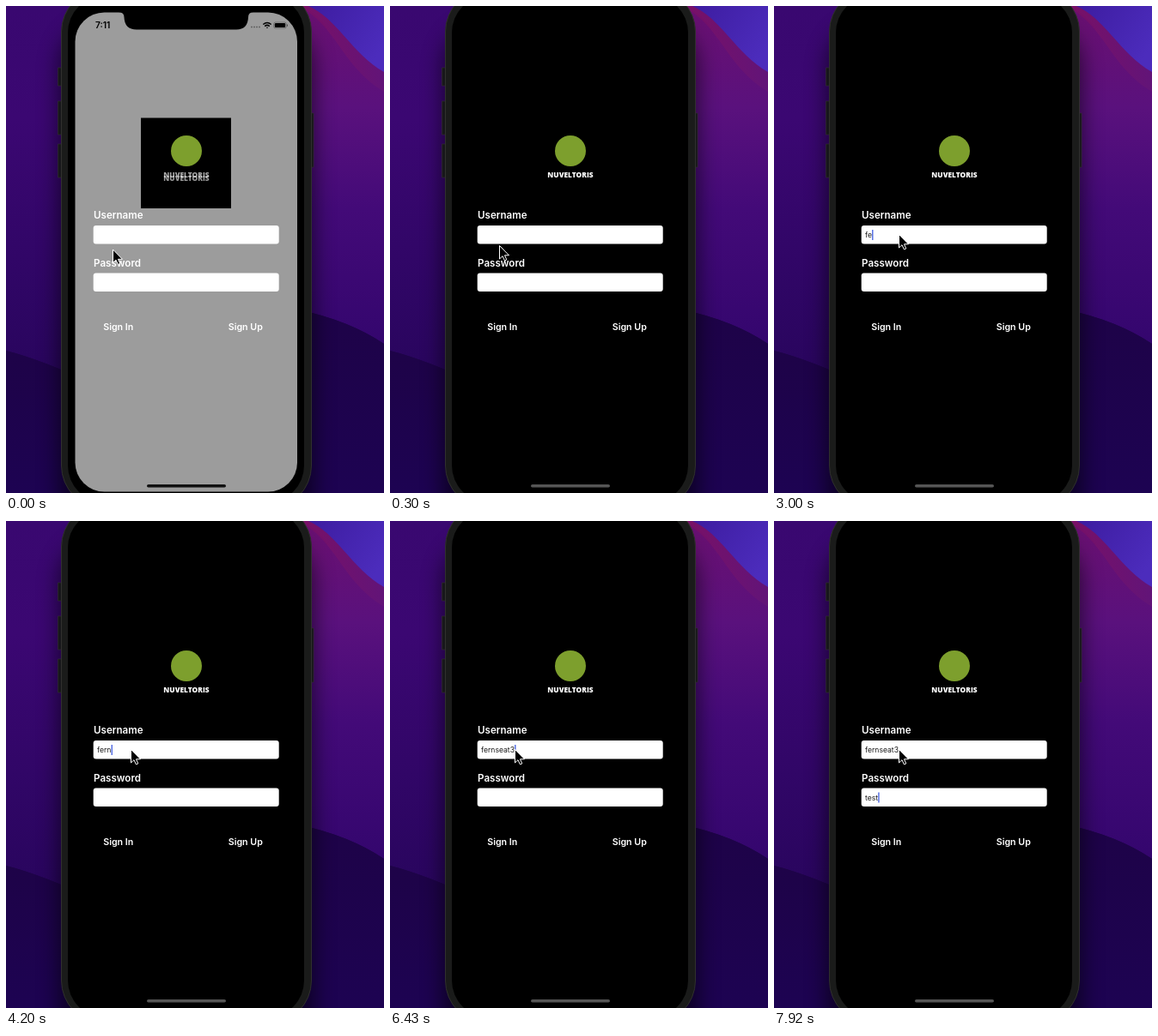
Recreate the animation shown at these times as an HTML page. Size 440 by 568 pixels, loop 8 s.

```html
<!DOCTYPE html>
<html lang="en">
<head>
<meta charset="utf-8">
<title>Sign-in screen</title>
<style>
  html, body { margin: 0; width: 100%; height: 100%; overflow: hidden; background: #1c0347; }
  svg { display: block; width: 440px; height: 568px; font-family: Inter, Roboto, sans-serif; }
  .label { font-size: 11.6px; font-weight: 600; fill: #fff; }
  .button { font-size: 10.7px; font-weight: 600; fill: #fff; }
  .entry { font-size: 8.6px; fill: #1a1a1a; }
  .brand { font: 800 8.4px "Open Sans", "Noto Sans", sans-serif; fill: #fff; text-anchor: middle; }
</style>
</head>
<body>
<svg viewBox="0 0 440 568">
  <defs>
    <linearGradient id="left" x2="0" y2="1">
      <stop offset="0" stop-color="#390870"/>
      <stop offset=".3" stop-color="#3b0772"/>
      <stop offset="1" stop-color="#28055d"/>
    </linearGradient>
    <linearGradient id="right" x2="0" y2="1">
      <stop offset="0" stop-color="#6a1070"/>
      <stop offset=".3" stop-color="#5a117d"/>
      <stop offset=".6" stop-color="#430a78"/>
      <stop offset="1" stop-color="#34066e"/>
    </linearGradient>
    <linearGradient id="low" x2="0" y2="1">
      <stop offset="0" stop-color="#1e0348"/>
      <stop offset="1" stop-color="#1d0352"/>
    </linearGradient>
    <linearGradient id="sky" x2="1" y2=".6">
      <stop offset="0" stop-color="#3d1ca0"/>
      <stop offset="1" stop-color="#4c2cbc"/>
    </linearGradient>
    <linearGradient id="band">
      <stop offset="0" stop-color="#7a1066"/>
      <stop offset="1" stop-color="#621478"/>
    </linearGradient>
    <filter id="blur" x="-30%" y="-30%" width="160%" height="160%">
      <feGaussianBlur stdDeviation="13"/>
    </filter>
  </defs>

  <!-- wallpaper -->
  <path d="M0 0H100V440Q40 412 0 402Z" fill="url(#left)"/>
  <path d="M0 402Q40 412 100 440V568H0Z" fill="url(#low)"/>
  <path d="M340 0H440V394Q400 367 340 354Z" fill="url(#right)"/>
  <path d="M340 0C385 22 390 70 440 100V77C402 55 385 14 352 0Z" fill="url(#band)"/>
  <path d="M352 0C385 14 402 55 440 77V0Z" fill="url(#sky)"/>
  <path d="M340 354Q400 367 440 394V568H340Z" fill="url(#low)"/>

  <!-- phone -->
  <rect x="62" y="20" width="296" height="600" rx="50" opacity=".6" filter="url(#blur)"/>
  <path d="M60.500 72h5v21h-5zM60.500 111h5v39h-5zM60.500 161h5v39h-5zM354 125h4v63h-4z" fill="#17171a" stroke="#33322f" stroke-width=".6"/>
  <rect x="64.500" y="-20" width="291" height="606" rx="50" fill="#1a1b1a" stroke="#30302e"/>
  <rect x="72" y="-12" width="275" height="591" rx="43"/>
  <rect id="screen" x="80.500" y="7.500" width="258.500" height="559" rx="34"/>
  <path d="M131 7Q137.500 7.500 137.500 13Q138 27.500 152 27.500H268Q281.500 27.500 282 13Q282 7.500 288 7Z"/>

  <!-- status bar -->
  <text x="104" y="26" font-size="10.2" font-weight="600">7:11</text>
  <path d="M285 24.500h11" stroke="#000" stroke-opacity=".35" stroke-width="1.600" stroke-dasharray="2 1"/>
  <g fill="none" stroke="#000" stroke-width="1.500">
    <path d="M299.300 21.500q4.700 -4 9.400 0M301.200 23.600q2.800 -2.400 5.600 0"/>
    <path d="M304 26.300l-1.200 -1.500h2.400z" stroke="none" fill="#000"/>
    <rect x="311.700" y="19" width="14.600" height="7" rx="2" stroke-opacity=".4" stroke-width=".7"/>
  </g>
  <rect x="312.800" y="20" width="12.400" height="5" rx="1.200"/>
  <rect x="327" y="21.500" width="1" height="2.200" opacity=".5"/>

  <!-- logo -->
  <rect x="157" y="130.500" width="105" height="105.500"/>
  <circle cx="210" cy="169" r="18" fill="#7d9f2d"/>
  <text class="brand" id="ghost" x="210" y="203.500">NUVELTORIS</text>
  <text class="brand" id="brand" x="210" y="199.800">NUVELTORIS</text>

  <!-- form -->
  <text class="label" x="102" y="248">Username</text>
  <text class="label" x="102" y="303.500">Password</text>
  <rect x="101.700" y="256" width="216" height="21.400" rx="3" fill="#fff"/>
  <rect x="101.700" y="311.500" width="216" height="21.400" rx="3" fill="#fff"/>
  <text class="button" x="113.200" y="378">Sign In</text>
  <text class="button" x="258.700" y="378">Sign Up</text>
  <rect id="mark" x="104" y="261" height="12" fill="#c8d5ec"/>
  <text class="entry" id="user" x="106" y="270"></text>
  <text class="entry" id="pass" x="106" y="325.500"></text>
  <rect id="caret" width="1.300" height="12" fill="#3f5ce0"/>

  <rect id="home" x="164" y="558" width="92" height="3.500" rx="1.750"/>
  <path id="pointer" d="M0 0V15.500L3.500 12.200L5.900 17.400L8.300 16.400L6 11.300H11Z" stroke="#fff"/>
</svg>
<script>
const LOOP = 8000, USER = "fernseat3", PASS = "test";
const userKeys = [2850, 3000, 3150, 3300, 4800, 4950, 5690, 5830, 6430];
const passKeys = [7480, 7630, 7780, 7920];
const blinks = [[0, 0], [1950, 1], [2550, 0], [2850, 1], [3750, .5], [3900, 0], [4200, 1],
  [5390, .5], [5540, 0], [5690, 1], [6280, .5], [6430, 1], [7330, .5], [7480, 1]];
const moves = [[0, "124.500 284"], [300, "127.500 279.500"], [1200, "140 271"], [1350, "145.500 266.500"]];
// time, screen, home bar, wordmark opacity, ghost opacity
const fades = [[0, "#9c9c9c", "#111", .65, .6], [150, "#434343", "#363636", .95, .4], [300, "#000", "#555", 1, 0]];

const $ = id => document.getElementById(id);
const set = (id, attrs) => {
  for (const name in attrs) $(id).setAttribute(name, attrs[name]);
};
const at = (steps, t) => steps.filter(step => step[0] <= t).pop();
const type = (id, text, keys, t) => {
  $(id).textContent = text.slice(0, keys.filter(k => k <= t).length);
  return $(id).textContent ? $(id).getComputedTextLength() : 0;
};

function draw(t) {
  const [, screen, home, brand, ghost] = at(fades, t);
  set("screen", { fill: screen });
  set("home", { fill: home });
  set("brand", { opacity: brand });
  set("ghost", { opacity: ghost });

  const userWidth = type("user", USER, userKeys, t);
  const passWidth = type("pass", PASS, passKeys, t);
  const inPass = t >= 6880;
  set("caret", {
    x: 106.200 + (inPass ? passWidth : userWidth),
    y: inPass ? 316.500 : 261,
    opacity: at(blinks, t)[1]
  });
  set("mark", { width: userWidth + 3, opacity: t >= 5090 && t < 6430 ? 1 : 0 });
  set("pointer", { transform: `translate(${at(moves, t)[1]})` });
}

const start = performance.now();
function tick() {
  draw((performance.now() - start) % LOOP);
  requestAnimationFrame(tick);
}
tick();
</script>
</body>
</html>
```
